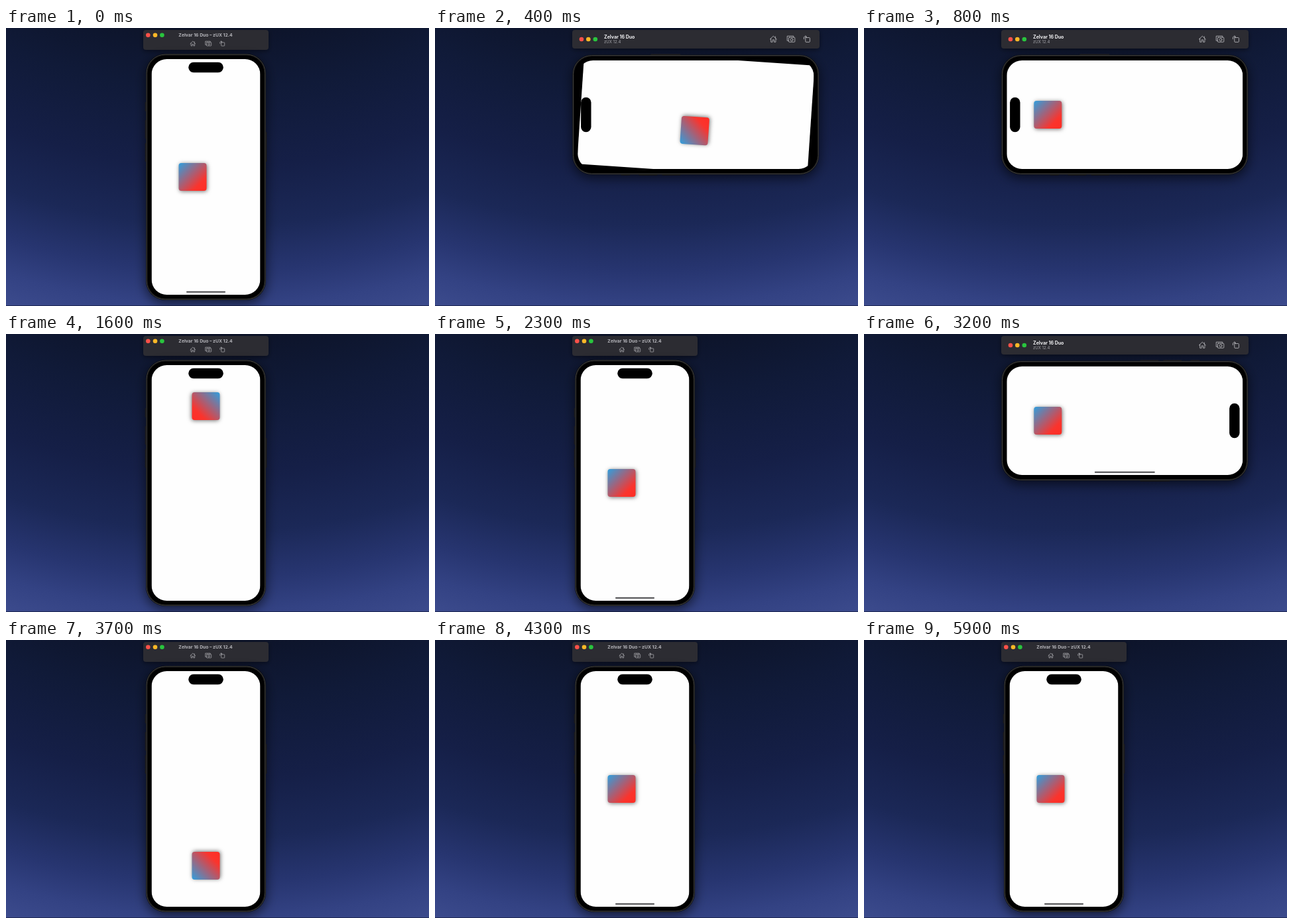
Write an HTML page with a canvas that moves like this. It is 638 by 420 pixels and loops after 6100 ms.

```html
<!DOCTYPE html>
<html lang="en">
<head>
<meta charset="utf-8">
<title>Device rotation</title>
<style>
  html, body { margin: 0; width: 100%; height: 100%; overflow: hidden; background: #0e152b; }
  canvas { display: block; width: 638px; height: 420px; }
</style>
</head>
<body>
<canvas id="stage" width="638" height="420"></canvas>
<script>
const ctx = document.getElementById('stage').getContext('2d');
const LOOP = 6100, STEP = 100;
const DEVICE = 'Zelvar 16 Duo', SYSTEM = 'zUX 12.4';
const FONT = 'Inter, "Liberation Sans", sans-serif';
const SHORT = 164, LONG = 356;
const QUARTER = Math.PI / 2;

// turn: device orientation in quarter turns; from: content angle before it settles;
// bar: when the home indicator starts to fade in, after the turn.
const PHASES = [
  { at: -2000, turn: 0, from: 0, bar: 450 },
  { at: 300, turn: -1, from: -1, bar: 620 },
  { at: 1600, turn: 0, from: 1, bar: 450 },
  { at: 2600, turn: 1, from: 1, bar: 450 },
  { at: 3700, turn: 0, from: -1, bar: 450 }
];
PHASES[1].from = 1 * PHASES[1].turn * -1;
PHASES[3].from = -1 * PHASES[3].turn * -1;
// Content first keeps its place on the glass, so it starts turned with the device.
for (const p of PHASES) if (p.turn) p.from = p.turn;

const clamp = v => Math.max(0, Math.min(1, v));
const mix = (a, b, k) => a + (b - a) * k;
const smooth = v => { v = clamp(v); return v * v * (3 - 2 * v); };

function box(x, y, w, h, r, fill) {
  ctx.beginPath();
  ctx.roundRect(x, y, w, h, r);
  ctx.fillStyle = fill;
  ctx.fill();
}

function centred(w, h, r, fill) { box(-w / 2, -h / 2, w, h, r, fill); }

function dot(x, y, r, fill) {
  ctx.beginPath();
  ctx.arc(x, y, r, 0, 2 * Math.PI);
  ctx.fillStyle = fill;
  ctx.fill();
}

function shadow(color, blur, x, y) {
  ctx.shadowColor = color;
  ctx.shadowBlur = blur;
  ctx.shadowOffsetX = x;
  ctx.shadowOffsetY = y;
}

function noShadow() { shadow('transparent', 0, 0, 0); }

function text(str, x, y, font, color, align) {
  ctx.font = `${font} ${FONT}`;
  ctx.fillStyle = color;
  ctx.textAlign = align;
  ctx.textBaseline = 'middle';
  ctx.fillText(str, x, y);
}

function backdrop() {
  const g = ctx.createRadialGradient(319, -700, 700, 319, -700, 1165);
  [[0, '#0d142a'], [0.2, '#101a38'], [0.45, '#151f47'], [0.64, '#1b2857'],
   [0.79, '#273570'], [0.9, '#334283'], [1, '#3c4b8d']]
    .forEach(([k, c]) => g.addColorStop(k, c));
  ctx.fillStyle = g;
  ctx.fillRect(0, 0, 638, 420);
  ctx.fillStyle = 'rgba(10,16,40,0.55)';
  ctx.fillRect(0, 419, 638, 1);
}

// Toolbar icons are drawn on a grid of roughly 10 units.
function icon(x, y, scale, draw) {
  ctx.save();
  ctx.translate(x, y);
  ctx.scale(scale, scale);
  ctx.strokeStyle = '#b4b4b8';
  ctx.lineWidth = 0.9;
  ctx.lineJoin = ctx.lineCap = 'round';
  ctx.beginPath();
  draw();
  ctx.stroke();
  ctx.restore();
}

function line(...pts) {
  pts.forEach(([x, y], i) => i ? ctx.lineTo(x, y) : ctx.moveTo(x, y));
}

function homeIcon() {
  line([-5, 0.3], [0, -4.5], [5, 0.3]);
  line([-3.6, -0.8], [-3.6, 4.5], [-1.2, 4.5], [-1.2, 1.2], [1.2, 1.2], [1.2, 4.5], [3.6, 4.5], [3.6, -0.8]);
  line([3, -3.8], [3, -1.8]);
}

function cameraIcon() {
  line([-3.8, 2.5], [-5.8, 2.5], [-5.8, -4.5], [3.8, -4.5], [3.8, -2.8]);
  ctx.roundRect(-3.6, -2.5, 9.4, 7, 1);
  ctx.moveTo(3, 1);
  ctx.arc(1.1, 1, 1.9, 0, 2 * Math.PI);
}

function rotateIcon() {
  ctx.roundRect(-2.2, -2.2, 6.6, 6.8, 0.9);
  line([-4.6, 0], [-4.6, -2.6], [-3.8, -3.6], [-0.8, -3.6]);
  line([-2.3, -5], [-0.8, -3.6], [-2.3, -2.2]);
}

function titleBar(wide) {
  shadow('rgba(0,0,0,0.45)', 7, 0, 2);
  box(207, 3, wide ? 373 : 189, wide ? 28 : 30, 4, '#2c2c32');
  noShadow();
  const lights = wide ? [221, 231.3, 241.8] : [214.3, 225, 235.4];
  ['#fb5149', '#fcb827', '#29c53e'].forEach((c, i) => dot(lights[i], wide ? 17 : 10.7, 3.3, c));
  if (wide) {
    text(DEVICE, 255, 13.7, 'bold 7px', '#f0f0f2', 'left');
    text(SYSTEM, 255, 21.6, '6px', '#a5a5aa', 'left');
  } else {
    text(`${DEVICE} – ${SYSTEM}`, 301, 10.6, 'bold 6.8px', '#b5b5ba', 'center');
  }
  const xs = wide ? [510.3, 537, 561] : [281.8, 305.2, 326.3];
  [homeIcon, cameraIcon, rotateIcon].forEach((draw, i) =>
    icon(xs[i], wide ? 16.7 : 23.5, wide ? 1 : 0.77, draw));
}

function body(angle) {
  ctx.save();
  ctx.rotate(angle);
  const metal = '#262628';
  [[-113, 14], [-86, 28], [-51, 28]].forEach(([y, h]) => box(-91.8, y, 3, h, 0.8, metal));
  box(88.8, -68, 3, 45, 0.8, metal);
  shadow('rgba(0,0,0,0.6)', 17, 0, 5);
  centred(181, 372, 29, '#0d0d0e');
  noShadow();
  ctx.beginPath();
  ctx.roundRect(-89.4, -184.9, 178.8, 369.8, 28);
  ctx.strokeStyle = '#42423f';
  ctx.lineWidth = 1;
  ctx.stroke();
  centred(175.4, 366.4, 26.5, '#000');
  ctx.restore();
}

function card(x, angle) {
  ctx.save();
  ctx.translate(x, 0);
  const g = ctx.createLinearGradient(-21, -21, 21, 21);
  g.addColorStop(0, '#2f9fdf');
  g.addColorStop(0.75, '#fa342d');
  g.addColorStop(1, '#ff2d24');
  const c = Math.cos(angle), s = Math.sin(angle);
  shadow('rgba(0,0,0,0.55)', 6, c - s, s + c);
  centred(42, 42, 4, g);
  ctx.restore();
}

function content(wide, from, k) {
  const [w, h] = wide ? [LONG, SHORT] : [SHORT, LONG];
  const angle = from * QUARTER * (1 - k);
  const viewW = from ? mix(h, w, k) : w;
  const viewH = from ? mix(w, h, k) : h;
  ctx.save();
  ctx.beginPath();
  ctx.roundRect(-w / 2, -h / 2, w, h, 23);
  ctx.clip();
  ctx.rotate(angle);
  centred(viewW, viewH, 0, '#fefefe');
  card(62 - viewW / 2, angle);
  ctx.restore();
}

function render(t) {
  const phase = PHASES.filter(p => p.at <= t).pop();
  const age = t - phase.at;
  const wide = phase.turn !== 0;
  const k = smooth((age - 50) / 400);

  backdrop();
  titleBar(wide);
  ctx.save();
  ctx.translate(wide ? 393.3 : 301.5, wide ? 131 : 225);
  body(phase.turn * QUARTER);
  content(wide, phase.from, k);

  ctx.save();
  ctx.rotate(phase.turn * QUARTER);
  box(-26.3, -173.2, 52.6, 15.4, 7.7, '#000');
  ctx.restore();

  ctx.globalAlpha = clamp((age - phase.bar) / 150);
  const barW = wide ? 91 : 59;
  box(-barW / 2, wide ? 76.7 : 172.7, barW, 2, 1, '#48484b');
  ctx.restore();
}

function tick() {
  const t = performance.now() % LOOP;
  render(Math.floor(t / STEP) * STEP);
  requestAnimationFrame(tick);
}
tick();
</script>
</body>
</html>
```
